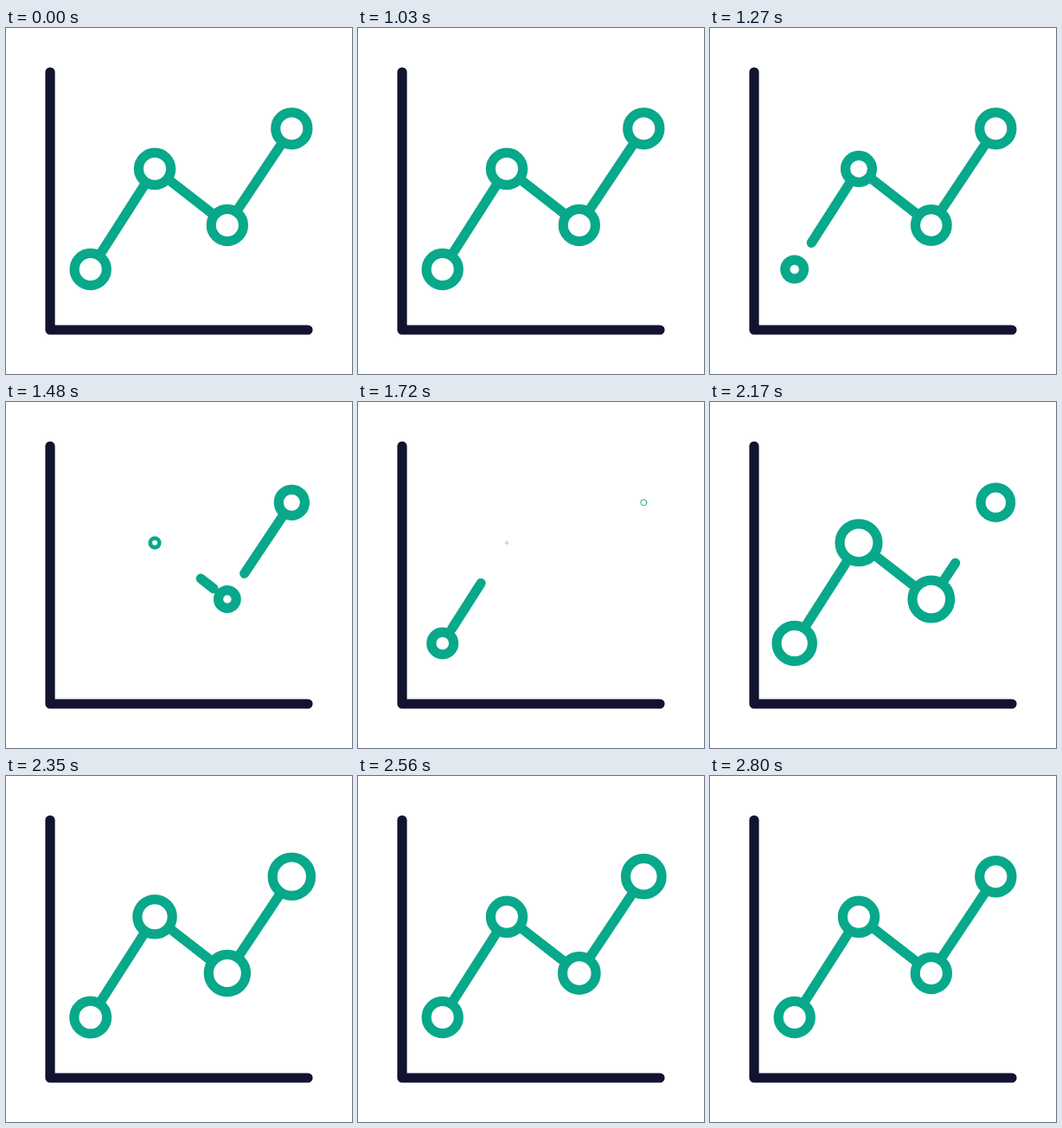
An HTML page for the animation above (2830 ms loop, 400x400 px).

```html
<!DOCTYPE html>
<html lang="en">
<head>
<meta charset="utf-8">
<title>Line chart</title>
<style>
  html, body { margin: 0; height: 100%; overflow: hidden; background: #fff; }
  svg { display: block; width: 100%; height: 100%; }
  path, line, circle { stroke-width: 11.2; stroke-linecap: round; stroke-linejoin: round; }
  path { fill: none; stroke: #121331; }
  line, circle { fill: #fff; stroke: #08a88a; }
</style>
</head>
<body>
<svg viewBox="0 0 400 400"><path d="M51 51V349H349"/></svg>
<script>
const LOOP = 2830, STEP = 30, RADIUS = 18.6, PEAK = 22.2, STROKE = 11.2, GAP = 20;
const points = [[97.7, 279], [172, 162.8], [255.8, 228], [330.3, 116.2]];
const growStarts = [1560, 1790, 2068];
const svg = document.querySelector('svg');

const add = tag => svg.appendChild(document.createElementNS('http://www.w3.org/2000/svg', tag));
const set = (el, attrs) => { for (const k in attrs) el.setAttribute(k, attrs[k]); };
const mix = (a, b, k) => a + (b - a) * k;
const progress = (t, start, length) => Math.min(1, Math.max(0, (t - start) / length));
const smooth = x => x * x * (3 - 2 * x);

// cubic-bezier(.33, 0, .26, 1)
function settle(x) {
  let lo = 0, hi = 1, u;
  for (let i = 0; i < 20; i++) {
    u = (lo + hi) / 2;
    const v = 1 - u;
    if (3 * v * v * u * .33 + 3 * v * u * u * .26 + u ** 3 < x) lo = u; else hi = u;
  }
  return smooth(u);
}

const lines = growStarts.map(() => add('line'));
const rings = points.map(([cx, cy]) => {
  const ring = add('circle');
  set(ring, { cx, cy });
  return ring;
});

function drawRing(ring, i, t) {
  const out = 1030 + i * 100, back = 1565 + i * 133;
  let r, width;
  if (t < back) {
    r = mix(RADIUS, 0, smooth(progress(t, out, 540)));
    width = STROKE * (1 - progress(t, out + 280, 120));
  } else {
    r = t < back + 400
      ? PEAK * settle(progress(t, back, 400))
      : mix(PEAK, RADIUS, smooth(progress(t, back + 400, 462)));
    width = STROKE * progress(t, back, 90);
  }
  set(ring, { r, visibility: width > 0 ? 'visible' : 'hidden' });
  ring.style.strokeWidth = width;
}

function drawLine(line, i, t) {
  const [x, y] = points[i], [x2, y2] = points[i + 1];
  const length = Math.hypot(x2 - x, y2 - y);
  const growing = t >= growStarts[i];
  const from = growing ? 0 : smooth(progress(t, 1200 + i * 105, 270));
  const to = growing ? smooth(progress(t, growStarts[i], 270)) : 1;
  const at = k => mix(GAP, length - GAP, k) / length;
  set(line, {
    x1: mix(x, x2, at(from)), y1: mix(y, y2, at(from)),
    x2: mix(x, x2, at(to)), y2: mix(y, y2, at(to)),
    visibility: to > from ? 'visible' : 'hidden'
  });
}

function draw(now) {
  // The motion advances in steps of 30 ms
  const t = Math.floor((now % LOOP - 10) / STEP) * STEP + 10;
  lines.forEach((line, i) => drawLine(line, i, t));
  rings.forEach((ring, i) => drawRing(ring, i, t));
}

const start = performance.now();
function tick() {
  draw(performance.now() - start);
  requestAnimationFrame(tick);
}
tick();
</script>
</body>
</html>
```
